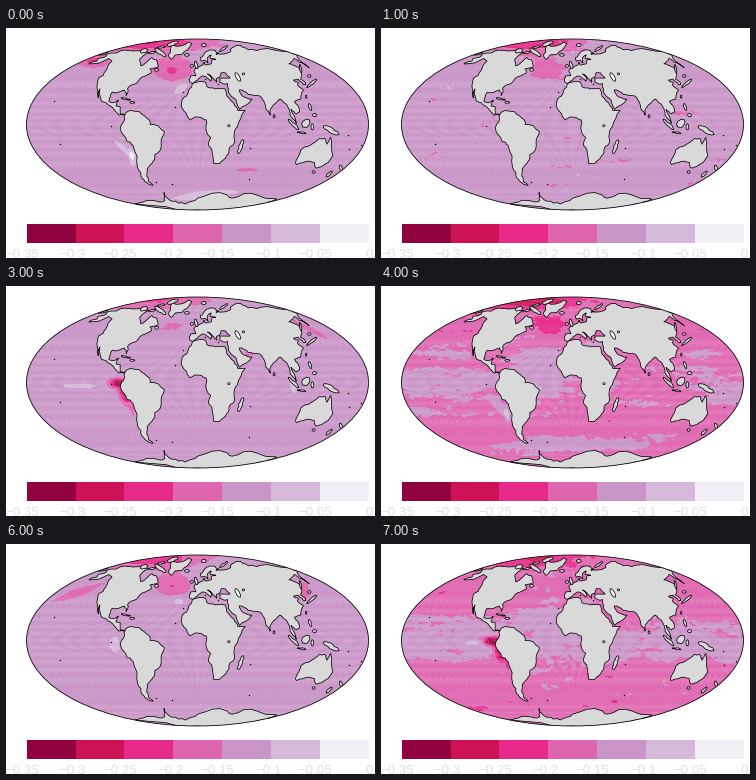
A matplotlib script that plays this animation: 369 by 230 pixels, repeating every 8 s.

```python
import numpy as np
import matplotlib.pyplot as plt
from matplotlib.animation import FuncAnimation
from matplotlib.colors import to_rgb
from matplotlib.patches import Ellipse, Polygon, Rectangle

W, H, DPI = 369, 230, 64
CX, CY, A, B = 191.5, 96.5, 171, 85.5
PX = 72 / DPI
COLORS = ["#91003f", "#ce1256", "#e7298a", "#df65b0", "#c994c7", "#d4b9da", "#f1eef6"]
LAND = "#d9d9d9"

# Rough coastlines as (lon, lat); detail is added by roughen()
NORTH_AMERICA = [
    (-168, 66), (-156, 71), (-128, 70), (-96, 68), (-82, 69), (-94, 60), (-82, 53), (-79, 55),
    (-77, 62), (-65, 59), (-56, 52), (-66, 50), (-61, 46), (-70, 42), (-76, 35), (-81, 31),
    (-80, 25), (-84, 30), (-97, 28), (-97, 20), (-91, 19), (-87, 21), (-88, 16), (-83, 15),
    (-82, 9), (-77, 8), (-83, 8), (-94, 16), (-105, 20), (-113, 31), (-110, 23), (-117, 32),
    (-124, 41), (-124, 48), (-134, 58), (-147, 61), (-162, 55), (-158, 58), (-165, 61),
    (-161, 64)]
SOUTH_AMERICA = [
    (-77, 8), (-72, 12), (-62, 11), (-51, 4), (-50, 0), (-35, -6), (-39, -14), (-41, -22),
    (-48, -26), (-54, -34), (-62, -39), (-67, -46), (-69, -51), (-66, -55), (-72, -54),
    (-75, -48), (-73, -38), (-70, -18), (-76, -14), (-81, -5), (-80, 0), (-77, 4)]
AFRICA = [
    (-6, 36), (10, 37), (11, 33), (20, 31), (32, 31), (37, 20), (43, 12), (51, 12), (42, -2),
    (39, -6), (40, -15), (35, -20), (33, -27), (26, -34), (19, -34), (12, -18), (14, -11),
    (9, -1), (9, 4), (4, 6), (-8, 4), (-17, 15), (-17, 21), (-10, 30)]
NORTH_EURASIA = [
    (-9, 37), (-9, 43), (-2, 43), (-5, 48), (8, 54), (10, 57), (11, 54), (20, 55), (23, 59),
    (30, 60), (21, 61), (25, 65), (17, 62), (16, 56), (11, 59), (6, 58), (5, 62), (15, 68),
    (26, 71), (41, 67), (34, 66), (44, 66), (67, 69), (73, 72), (104, 77), (113, 74),
    (140, 72), (180, 69), (180, 65)]
SOUTH_EURASIA = [
    (163, 59), (157, 51), (156, 57), (160, 61), (136, 55), (141, 53), (140, 48), (128, 40),
    (129, 35), (126, 35), (125, 40), (118, 39), (122, 37), (119, 35), (122, 30), (114, 22),
    (106, 20), (109, 12), (105, 9), (100, 13), (104, 1), (98, 8), (97, 16), (91, 22),
    (80, 15), (77, 8), (73, 19), (67, 25), (57, 26), (48, 30), (51, 24), (60, 22), (45, 13),
    (35, 28), (36, 36), (27, 37), (28, 41), (41, 41), (37, 46), (31, 46), (28, 42), (23, 40),
    (23, 37), (19, 41), (13, 45), (18, 40), (16, 38), (11, 42), (6, 43), (0, 39), (-6, 36)]
AUSTRALIA = [
    (114, -22), (122, -18), (130, -12), (136, -12), (140, -17), (142, -11), (153, -27),
    (150, -37), (144, -38), (137, -33), (131, -32), (118, -35), (115, -33)]
ANTARCTICA = [
    (-180, -78), (-150, -76), (-100, -73), (-75, -73), (-58, -63), (-61, -74), (-35, -78),
    (0, -70), (55, -66), (72, -70), (110, -66), (170, -71), (180, -78), (180, -90),
    (-180, -90)]
GREENLAND = [
    (-73, 78), (-35, 83), (-18, 80), (-22, 71), (-40, 65), (-43, 60), (-51, 64), (-54, 69)]
CHUKOTKA = [(-180, 69), (-170, 66), (-180, 65)]

# Islands: lon, lat, half length, half width (px), tilt
ISLANDS = [
    (-73, 68, 7, 2, 35), (-111, 70, 4, 2, -20), (-80, 80, 6, 2, -20), (-90, 75, 4, 1, -10),
    (-19, 65, 2.5, 1.4, 0), (18, 78, 2.5, 1.5, 0), (60, 73, 5, 1.2, -35), (-2, 54, 4, 1.6, 75),
    (-8, 53, 1.6, 1.4, 0), (-56, 49, 2, 1.5, 0), (-79, 22, 4.8, .8, 12), (-71, 19, 2.5, .9, 0),
    (47, -19, 7.5, 2, -70), (81, 7, 1.6, 1, 90), (101, 0, 7.5, 1.5, 45), (110, -7, 4.5, .8, 8),
    (114, 1, 5, 3.5, -50), (121, -2, 3.2, 1.4, 90), (141, -5, 9, 2.6, 28),
    (121, 15, 3.8, 1.3, 70), (124, 8, 2, 1.6, 0), (137, 36, 6.5, 1.3, -40),
    (143, 43, 1.8, 1.4, 0), (143, 50, 4.5, .8, 80), (147, -42, 1.6, 1.3, 0),
    (175, -38, 3, 1.4, 70), (170, -44, 4.2, 1.2, -45), (121, 24, 1.6, .7, 90)]
LAKES = [(51, 42, 5, 1.8, 60), (33, -1, 1.2, 1, 0), (60, 45, 1.2, 1, 0)]
SPECKS = [(-157, 20), (-149, -17), (-91, -1), (57, -20), (70, -49), (178, -18), (166, -21),
          (160, -9), (-37, -54), (-59, -52), (-16, 28), (-24, 15), (9, 40), (25, 35)]


def project(points):
    """Mollweide projection to stage pixels."""
    lon, lat = np.radians(np.array(points, float)).T
    t = lat * .85
    for _ in range(40):
        slope = np.maximum(2 + 2 * np.cos(2 * t), 1e-3)
        t = np.clip(t - (2 * t + np.sin(2 * t) - np.pi * np.sin(lat)) / slope,
                    -np.pi / 2, np.pi / 2)
    return np.column_stack([CX + A * lon / np.pi * np.cos(t), CY - B * np.sin(t)])


def roughen(pts, rng, rounds=2):
    """Move seeded midpoints sideways for a ragged coast."""
    for _ in range(rounds):
        side = np.roll(pts, -1, 0) - pts
        push = np.clip(rng.normal(0, .09, (len(pts), 1)), -.15, .15)
        mid = pts + side / 2 + push * side[:, ::-1] * [1, -1]
        pts = np.stack([pts, mid], 1).reshape(-1, 2)
    return pts


def islet(lon, lat, rx, ry, tilt):
    a = np.linspace(0, 2 * np.pi, 9)[:-1]
    c, s = np.cos(np.radians(tilt)), np.sin(np.radians(tilt))
    x, y = rx * np.cos(a), ry * np.sin(a)
    return project([(lon, lat)]) + np.column_stack([x * c - y * s, x * s + y * c])


X, Y = np.meshgrid(np.arange(W) + .5, np.arange(H) + .5)


def noise(seed, sx, sy):
    """Smooth seeded noise with unit spread."""
    raw = np.random.default_rng(seed).normal(size=(H, W))
    fx, fy = np.fft.fftfreq(W)[None, :], np.fft.fftfreq(H)[:, None]
    keep = np.exp(-2 * np.pi**2 * ((sx * fx)**2 + (sy * fy)**2))
    out = np.fft.ifft2(np.fft.fft2(raw) * keep).real
    return out / out.std()


def grid_grain():
    """Faint moire left by a one degree grid of dots."""
    t = np.arcsin(np.clip((CY - Y) / B, -1, 1))
    lat = np.degrees(np.arcsin(np.clip((2 * t + np.sin(2 * t)) / np.pi, -1, 1)))
    lon = 180 * (X - CX) / (A * np.maximum(np.cos(t), .02))
    return .09 + .05 * np.cos(2 * np.pi * lat) + .035 * np.cos(2 * np.pi * lon)


def blob(x, y, rx, ry, change=1, slope=0):
    dx = X - x
    return change * np.exp(-(dx / rx)**2 - ((Y - y - slope * dx) / ry)**2)


ARCTIC = blob(140, 14, 58, 9)
NORTH_ATLANTIC = blob(167, 41, 18, 11)
TROPICS = np.exp(-((Y - 98) / 23)**4)
ATLANTIC = np.maximum(blob(160, 88, 42, 36), blob(205, 61, 18, 6))
WARM = [(118, 121, 12, 5, 1, .8), (126, 128, 3, 8, 1.5, .6)]
COLD = [(113, 97, 9, 4, -4.2), (119, 109, 6, 8, -3, .6), (127, 124, 3, 8, -1, 1)]
PALE, DEEP = 4.5, 3.45

# Base level, noise, arctic, north Atlantic, tropics, Atlantic, local blobs
MAPS = [
    (PALE, .1, -2.6, -1.5, 0, 0, WARM, [
        (88, 33, 14, 6, -1.9), (200, 167, 34, 5, 1, -.1), (175, 60, 7, 5, 1.2, -.5),
        (242, 142, 16, 2, -.9)]),
    (PALE, .22, -2.2, -1.1, 0, 0, [], []),
    (DEEP, .22, -1.7, 0, 1.2, .5, [], [(70, 69, 22, 4, .9)]),
    (PALE, .1, -1.6, -.5, 0, 0, COLD, [
        (78, 100, 20, 2.5, 1), (305, 44, 20, 3, -1.1, .5), (287, 100, 4, 7, 1, 1),
        (244, 68, 8, 3, -.9)]),
    (DEEP, .24, -2.2, -1.3, .5, 1, WARM, [
        (75, 128, 42, 5, .9), (200, 160, 90, 9, 1), (50, 66, 30, 5, .8),
        (318, 68, 28, 7, .9), (50, 97, 60, 11, .6)]),
    (DEEP, .24, -1.8, -.9, .8, .8, [], [(190, 162, 70, 6, .7)]),
    (PALE, .08, -2.4, -1.5, 0, 0, [], [
        (74, 48, 27, 4, -1.2, -.35), (299, 48, 5, 9, -1.2), (109, 101, 8, 10, .8),
        (173, 57, 6, 4, 1), (212, 167, 18, 4, 1)]),
    (DEEP, .25, -1.4, .4, .9, .8, COLD, [
        (60, 74, 35, 4, .8), (93, 99, 12, 3, 1), (280, 150, 40, 3, .7)])]

PALETTE = np.array([to_rgb(c) for c in COLORS])
GRAIN = grid_grain()[..., None]


def ocean(i):
    base, rough, arctic, north, tropic, atlantic, coast_blobs, local = MAPS[i]
    level = base + rough * (.75 * noise(i, 11, 2.2) + .45 * noise(i + 50, 1.6, .8))
    level += arctic * ARCTIC + north * NORTH_ATLANTIC
    level += np.maximum(tropic * TROPICS, 1.2 * atlantic * ATLANTIC)
    level += sum(blob(*b) for b in coast_blobs + local)
    rgb = PALETTE[np.clip(np.floor(level), 0, 6).astype(int)]
    return rgb + (1 - rgb) * GRAIN


fig = plt.figure(figsize=(W / DPI, H / DPI), dpi=DPI, facecolor="white")
ax = fig.add_axes([0, 0, 1, 1])
ax.set(xlim=(0, W), ylim=(H, 0))
ax.axis("off")

rim = Ellipse((CX, CY), 2 * A, 2 * B, fc="none", ec="black", lw=.8 * PX, zorder=5)
ax.add_patch(rim)
oceans = [ocean(i) for i in range(len(MAPS))]
sea = ax.imshow(oceans[0], extent=(0, W, H, 0), interpolation="nearest", aspect="auto")
sea.set_clip_path(rim)


def coast(pts, fill=LAND):
    shape = Polygon(pts, fc=fill, ec="black", lw=.75 * PX, zorder=3)
    ax.add_patch(shape)
    shape.set_clip_path(rim)


rng = np.random.default_rng(4)
for land in [NORTH_AMERICA, SOUTH_AMERICA, AFRICA, NORTH_EURASIA + SOUTH_EURASIA,
             AUSTRALIA, ANTARCTICA, GREENLAND, CHUKOTKA]:
    coast(roughen(project(land), rng))
for island in ISLANDS:
    coast(roughen(islet(*island), rng, 1))
for lake in LAKES:
    coast(islet(*lake), "white")
ax.plot(*project(SPECKS).T, "o", ms=1.4 * PX, mew=0, color="black", zorder=4)

# Colour bar
step = 342 / 7
for k, color in enumerate(COLORS):
    ax.add_patch(Rectangle((20.7 + k * step, 196), step, 19, fc=color, lw=0))
labels = ["−0.35", "−0.3", "−0.25", "−0.2", "−0.15", "−0.1", "−0.05", "0"]
shift = {5: -4.5, 4: -2.5, 1: 0}
for k, label in enumerate(labels):
    ax.text(20.7 + k * step + shift[len(label)], 230.3, label, ha="center", va="baseline",
            family="Liberation Sans", size=13.4 * PX, color="#e0e0e0")


def update(i):
    sea.set_data(oceans[i])
    return sea,


anim = FuncAnimation(fig, update, frames=len(MAPS), interval=1000, repeat=True,
                     repeat_delay=0, blit=False)
plt.show()
```
